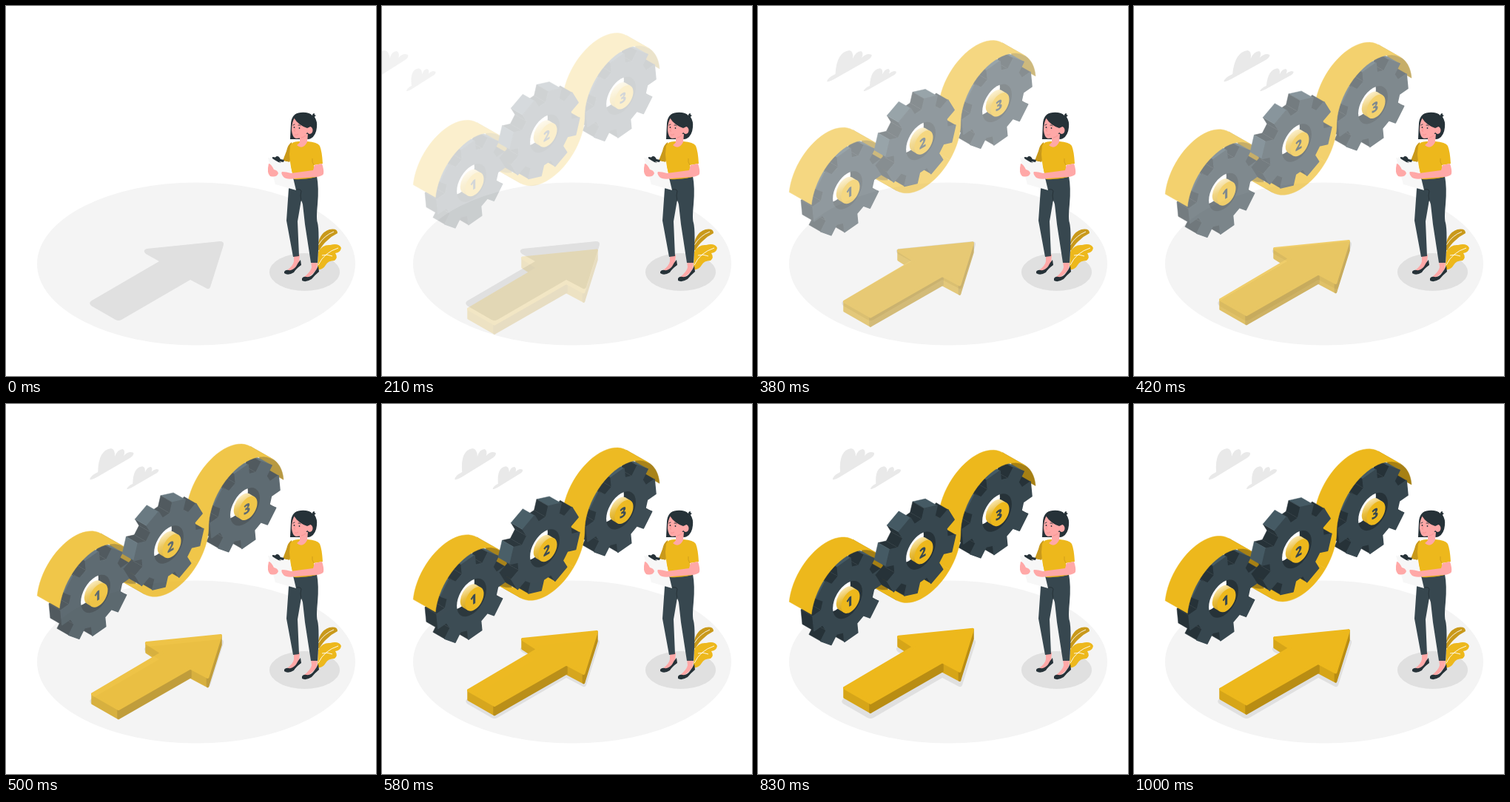
Animation of 500 by 500 pixels, one loop 1040 ms. Source, as an HTML page:

```html
<!DOCTYPE html>
<html lang="en">
<head>
<meta charset="utf-8">
<title>Gears and arrow</title>
<style>
  html, body { margin: 0; width: 100%; height: 100%; overflow: hidden; background: #fff; }
  svg { display: block; width: 100%; height: 100%; }
  text { font: 800 18px "Open Sans", Roboto, sans-serif; text-anchor: middle; fill: #37474f; }
</style>
</head>
<body>
<svg viewBox="0 0 500 500">
  <defs>
    <linearGradient id="hubSide" x1="0" y1="0" x2="0" y2="1">
      <stop offset="0" stop-color="#f9e6ae"/>
      <stop offset=".45" stop-color="#e9bd3c"/>
      <stop offset="1" stop-color="#cf9f17"/>
    </linearGradient>
    <clipPath id="holeClip"><circle r="23"/></clipPath>
    <path id="cloud" d="M101 102Q101 97 111 92Q109 62 126 60Q132 61 132 71Q135 61 142 61Q146 63 144 70Q150 63 157 66Q158 70 151 74L110 99Q102 103 101 102Z"/>
  </defs>

  <ellipse cx="257" cy="348.5" rx="215" ry="110" fill="#f4f4f4"/>
  <ellipse cx="403.5" cy="359.5" rx="47.5" ry="25.5" fill="#e0e0e0"/>
  <path fill="#e0e0e0" d="M190 328L289 318Q295 318 294 323L276 380Q274 384 270 381L249 370L156 424Q152 426 148 424L115 405Q111 401 116 398L207 345L189 335Q184 330 190 328Z"/>

  <g id="clouds" fill="#e9e9e9">
    <use href="#cloud"/>
    <use href="#cloud" transform="translate(78.3 40.5) scale(.73)"/>
  </g>
  <g id="arrow" stroke-linejoin="round"></g>
  <g id="machine" stroke-linejoin="round"></g>

  <g id="plant">
    <path fill="#c9991a" d="M421 328Q422 307 437 302Q448 300 448 307Q440 311 434 317Q428 322 423 331Z"/>
    <path fill="#edb81c" d="M421 356L422 332Q428 322 438 323Q450 320 453 327Q452 333 445 334Q449 340 444 344Q435 344 432 350Q428 357 421 356Z"/>
    <path fill="none" stroke="#fff" stroke-width=".9" d="M422 323Q430 310 443 305M422 350Q430 333 449 327M427 337Q434 335 441 338"/>
  </g>

  <g id="woman">
    <path fill="#ffa8a7" d="M389 336L397 336L396 347Q391 355 383 359L380 357Q388 351 389 345ZM412 345L421 345L420 355Q415 363 406 368L403 366Q412 359 413 353Z"/>
    <path fill="#263238" d="M376 359Q378 356 382 357Q387 358 392 352Q395 346 398 343L399 350Q392 355 389 360Q381 365 376 361ZM400 368Q402 365 406 366Q412 367 416 361Q420 356 422 351L423 359Q417 364 413 369Q405 374 400 371Z"/>
    <path fill="#37474f" d="M388 232L420 230Q423 245 421 268Q419 288 421 293Q424 305 421 347L412 347L404 295L401 268L399 262L394 291L396 338L388 339L379 290L382 247Z"/>
    <path fill="none" stroke="#263238" d="M392 248Q398 247 399 250Q397 255 399 264"/>
    <path fill="#c9991a" d="M386 184Q381 187 379 196L374 209L383 211L388 200Z"/>
    <path fill="#edb81c" d="M395 183Q386 183 384 189L383 200Q384 218 389 234Q405 235 420 231L416 215L428 213Q427 196 424 189Q421 184 407 183Z"/>
    <path fill="none" stroke="#c9991a" stroke-width=".8" d="M389 232Q405 235 420 230M416 215Q413 211 414 206"/>
    <path fill="#263238" d="M384 180L385 159Q386 145 398 144Q409 143 414 148Q414 145 417 145Q416 147 419 148Q417 149 417 150Q421 156 420 164Q419 175 412 179Q408 181 405 179L397 180Z"/>
    <path fill="#ffa8a7" d="M397 172L408 173L407 184Q401 195 393 188Q396 186 397 184Z"/>
    <path fill="#ffa8a7" d="M390 151Q386 157 386 168Q387 178 392 179Q402 179 407 171L408 164Q397 162 390 151Z"/>
    <ellipse cx="410.5" cy="168" rx="4" ry="5" fill="#ffa8a7"/>
    <path fill="#263238" d="M389 151Q395 161 407 165Q413 163 416 158L410 147L395 146Z"/>
    <path fill="none" stroke="#263238" stroke-width=".9" stroke-linecap="round" d="M388 161L390 160M395 161Q397 160 398 162"/>
    <g fill="#263238"><circle cx="389.5" cy="164" r=".9"/><circle cx="396.5" cy="165" r=".9"/></g>
    <path fill="none" stroke="#f28f8f" stroke-width=".8" d="M391 164L389.5 169L391 169.500M390 174Q393 175 395 173M399 178Q403 177 405 175"/>
    <path fill="#f7f7f7" d="M354 205L383 211L392 249L364 241Z"/>
    <path fill="#263238" d="M360 206L360 204L364 204.500Q366 202 369 204L371 207L376 208L375 211L369 210L372 212Q367 211 363 208Z"/>
    <path fill="#ffa8a7" d="M355 213Q352 226 357 230Q366 232 368 226Q367 222 362 221Q358 213 355 213Z"/>
    <path fill="#ffa8a7" d="M417 215L427 213Q430 222 429 227Q427 230 419 231L392 233Q379 235 375 231Q371 226 373 224Q379 224 385 226L415 222Z"/>
  </g>
</svg>

<script>
const YELLOW = '#edb81c', OCHRE = '#a68014', SHADE = '#b98d13', MID = '#d6a518';
const LOOP = 1040, FRAME = 1000 / 24;
const $ = id => document.getElementById(id);
const rad = deg => deg * Math.PI / 180;
const range = (n, f) => Array.from({ length: n }, (_, i) => f(i));
const shift = (p, v) => [p[0] + v[0], p[1] + v[1]];
const dot = (a, b) => a[0] * b[0] + a[1] * b[1];
const polar = (r, deg) => [r * Math.cos(rad(deg)), r * Math.sin(rad(deg))];
const poly = (pts, fill, seam = .5) =>
  `<polygon points="${pts.map(p => p.map(v => v.toFixed(2))).join(' ')}" fill="${fill}" stroke="${fill}" stroke-width="${seam}"/>`;

// Point on a circle lying in the upright isometric plane
const iso = (c, r, deg) => {
  const [u, v] = polar(r, deg);
  return [c[0] + u * .866, c[1] + v - u * .5];
};

function gear(c, phase, label) {
  const depth = [-16, -9.2];
  const tooth = [[41.5, -14.5], [54.5, -11], [54.5, 11], [41.5, 14.5]];
  const outline = range(8, i => tooth.map(([r, a]) => ({ r, a: phase + i * 45 + a }))).flat();
  const pts = outline.map(o => iso(c, o.r, o.a));
  const sides = pts.map((p, i) => {
    const j = (i + 1) % pts.length, q = pts[j];
    const [a, b] = [outline[i], outline[j]].map(o => polar(o.r, o.a));
    const normal = (Math.atan2(a[0] - b[0], b[1] - a[1]) * 180 / Math.PI + 360) % 360;
    return { p, q, normal, tip: i % 4 === 1, key: dot(shift(p, q), depth) };
  }).filter(s => s.normal > 135 && s.normal < 315).sort((a, b) => a.key - b.key);
  const walls = sides.map(s => poly([s.p, s.q, shift(s.q, depth), shift(s.p, depth)],
    s.tip && s.normal > 190 ? '#455a64' : '#263238')).join('');
  return walls + poly(pts, '#37474f', 1.5) +
    `<g transform="matrix(.866 -.5 0 1 ${c})">
      <circle r="23" fill="#263238"/>
      <g clip-path="url(#holeClip)"><circle cx="-18.500" cy="-18.500" r="23" fill="#fff"/></g>
      <path d="M-13.650 6.350A14.500 14.500 0 0 1 6.850 -14.150L14.850 -5.950L-5.650 14.550Z" fill="url(#hubSide)"/>
      <circle cx="4.600" cy="4.300" r="14.500" fill="${YELLOW}"/>
      <text x="3" y="10.500">${label}</text>
    </g>`;
}

// Strip of belt along arcs given as [center, from, to]
function belt(fill, ...arcs) {
  const front = arcs.flatMap(([c, from, to]) => range(25, i => iso(c, 58.5, from + (to - from) * i / 24)));
  const back = front.map(p => shift(p, [-30, -17])).reverse();
  return poly([...front, ...back], fill);
}

const loop1 = [122.5, 260.7], loop2 = [223.2, 201.4], loop3 = [324.5, 143];
$('machine').innerHTML =
  belt(OCHRE, [loop1, 315, 360], [loop2, 180, 135]) +
  belt(OCHRE, [loop3, 315, 355]) +
  belt(YELLOW, [loop2, 135, 45]) +
  gear([121, 263], -6, 1) + gear([323, 145.3], -6, 3) +
  belt(YELLOW, [loop1, 187, 315]) +
  belt(YELLOW, [loop2, 45, 0], [loop3, 180, 315]) +
  gear([220, 196.5], -28, 2);

function arrow() {
  const [left, tip, low, elbow, end, tail, notch] =
    [[190, 316.500], [290, 306.500], [272.5, 362.500], [249, 350], [152, 405.500], [117, 385.500], [211, 330]];
  const drop = p => shift(p, [0, 12.5]);
  const side = (a, b, fill) => poly([a, b, drop(b), drop(a)], fill, 3.5);
  return side(notch, left, MID) + side(elbow, low, MID) + side(low, tip, SHADE) +
    side(tail, end, MID) + side(end, elbow, SHADE) +
    poly([left, tip, low, elbow, end, tail, notch], YELLOW, 4);
}
$('arrow').innerHTML = arrow();

// Cloud entrance: [frame, x shift, skew, opacity]
const cloudKeys = [[-1.5, -250, 20, 0], [10.2, 0, -10, 1], [14, 0, 1, 1], [16, 0, 0, 1], [30, 0, 0, 1]];
function cloudPose(n) {
  const i = cloudKeys.findIndex(k => k[0] > n);
  const a = cloudKeys[i - 1], b = cloudKeys[i], k = (n - a[0]) / (b[0] - a[0]);
  return a.map((v, j) => v + (b[j] - v) * k);
}

function render(ms) {
  const n = Math.floor((ms % LOOP + 6) / FRAME);
  const slide = Math.min(1, Math.max(0, (n - 1) * .025, (n - 2.4) / 12));
  const drift = n > 14.4 ? 2.2 * Math.sin(Math.PI * (n - 14.4) / 10.6) : 0;
  const y = -30 * (1 - slide) - .5 + drift;
  for (const [id, dy] of [['machine', y], ['arrow', -y]]) {
    $(id).setAttribute('transform', `translate(0 ${dy.toFixed(2)})`);
    $(id).setAttribute('opacity', slide);
  }
  const [, x, skew, opacity] = cloudPose(n);
  $('clouds').setAttribute('transform', `translate(${250 + x} 250) skewX(${skew}) translate(-250 -250)`);
  $('clouds').setAttribute('opacity', n < 2 ? 0 : opacity);
}

const start = performance.now();
function tick() {
  render(performance.now() - start);
  requestAnimationFrame(tick);
}
tick();
</script>
</body>
</html>
```
